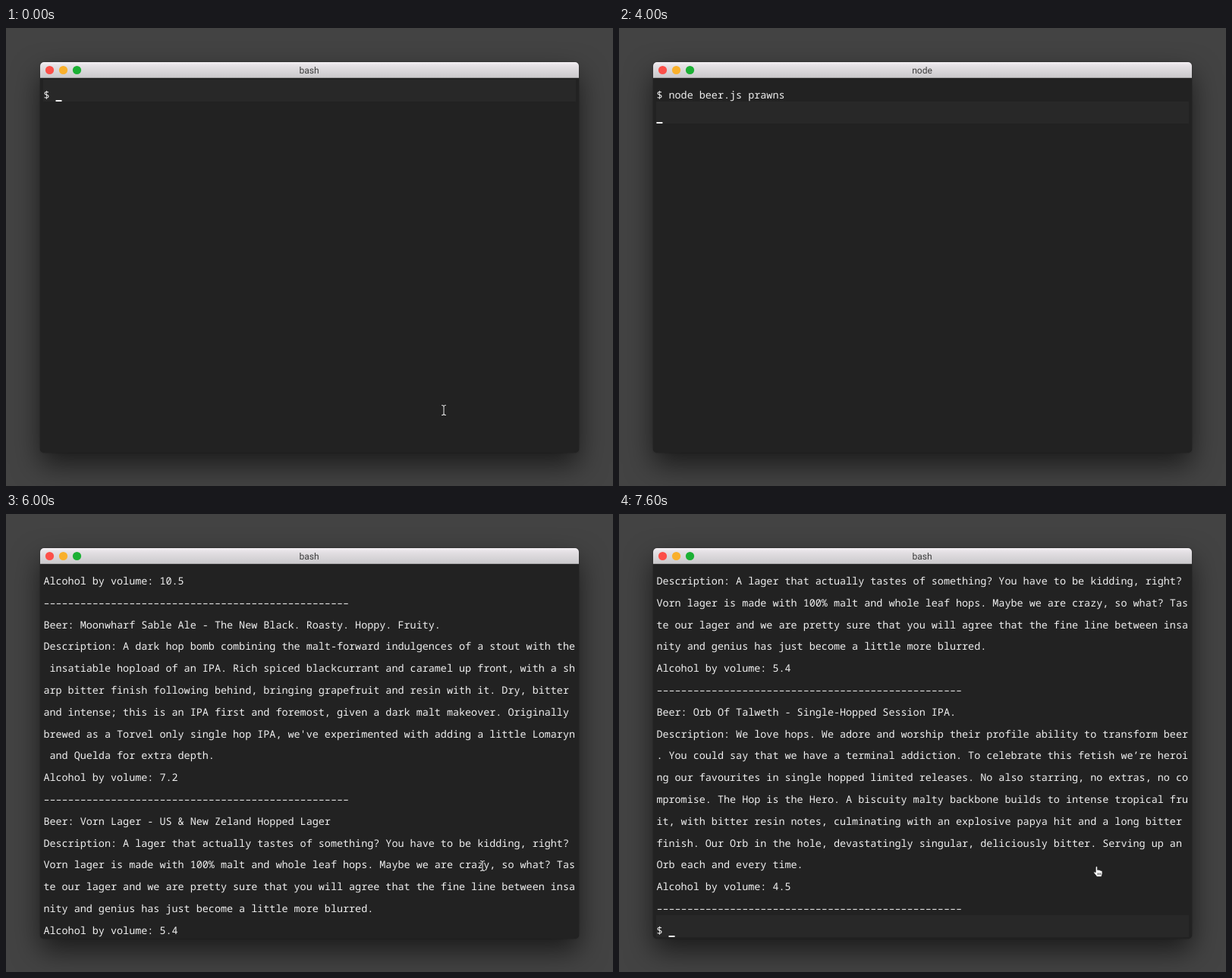
An HTML page for the animation above (7.8 s loop, 800x604 px).

```html
<!DOCTYPE html>
<html lang="en">
<head>
<meta charset="utf-8">
<title>Terminal</title>
<style>
  html, body { margin: 0; width: 100%; height: 100%; overflow: hidden; background: #434343; }
  .window {
    position: absolute; left: 45px; top: 45px; width: 710px; height: 515px;
    border-radius: 5px; background: #222; overflow: hidden;
  }
  .shadow { box-shadow: 0 16px 36px rgba(0, 0, 0, .6), 0 0 2px rgba(0, 0, 0, .4); }
  .bar {
    height: 20px; border-bottom: 1px solid #a9a8a9;
    background: linear-gradient(#f4f0f4, #e4e0e4 25%, #cbcacc);
  }
  svg { position: absolute; left: 0; top: 0; width: 800px; height: 604px; }
  text { white-space: pre; text-rendering: geometricPrecision; }
  #title { font: 12px Roboto, sans-serif; fill: #3a3a3a; text-anchor: middle; }
  #rows { font: 13.433px "Noto Sans Mono", monospace; fill: #f0f0f0; }
</style>
</head>
<body>
<div class="window shadow"><div class="bar"></div></div>
<svg viewBox="0 0 800 604">
  <circle cx="57.5" cy="55.5" r="5.6" fill="#fc4f49"/>
  <circle cx="75.5" cy="55.5" r="5.6" fill="#f9b02b"/>
  <circle cx="93.5" cy="55.5" r="5.6" fill="#1bb034"/>
  <text id="title" x="399.5" y="60"></text>
  <rect id="band" x="49" width="702" height="29" fill="#282828"/>
  <g id="rows"></g>
  <rect id="caret" width="8" height="2" fill="#f0f0f0"/>
  <g id="beam" fill="none" stroke-linecap="round">
    <path id="stem" d="M-2.5-6.5Q0-6.5 0-4.5Q0-6.5 2.5-6.5M0-5V5M-2.5 6.5Q0 6.5 0 4.5Q0 6.5 2.5 6.5" stroke="#222" stroke-width="2.2"/>
    <use href="#stem"/>
    <path d="M-2.5-6.5Q0-6.5 0-4.5Q0-6.5 2.5-6.5M0-5V5M-2.5 6.5Q0 6.5 0 4.5Q0 6.5 2.5 6.5" stroke="#ddd" stroke-width="1.1"/>
  </g>
  <g id="hand" transform="translate(625 464)" stroke="#222" stroke-width=".8" stroke-linejoin="round">
    <path fill="#fff" d="M3.2 8.6V2Q3.2.7 4.4.7T5.6 2V5.5Q6.7 4.6 7.6 5.7Q8.8 5 9.7 6.3Q11.8 5.8 12 7.8V10.6L10.8 14.3H4.8L.9 9.3Q.5 8 1.6 7.8Z"/>
    <path fill="none" d="M6 9.3V12M7.9 9.3V12M9.8 9.3V12"/>
  </g>
</svg>
<script>
const LOOP = 7800, COLS = 87, ROWS = 17;
const LEFT = 49.4, TOP = 68, CELL = 8.06, PITCH = 28.8;
const COMMAND = "node beer.js prawns";

const beers = [
  ["Quietly Unbound - White Wine Barrel-Aged Imperial Red Saison.",
   "This French white wine barrel aged Imperial Saison has a plethora of intertwining flavours. Huge aromas of peach, syrup, tangerine, sherry, toffee and raisin, followed by a dynamic bracing acidity.",
   "10.5"],
  ["Moonwharf Sable Ale - The New Black. Roasty. Hoppy. Fruity.",
   "A dark hop bomb combining the malt-forward indulgences of a stout with the insatiable hopload of an IPA. Rich spiced blackcurrant and caramel up front, with a sharp bitter finish following behind, bringing grapefruit and resin with it. Dry, bitter and intense; this is an IPA first and foremost, given a dark malt makeover. Originally brewed as a Torvel only single hop IPA, we've experimented with adding a little Lomaryn and Quelda for extra depth.",
   "7.2"],
  ["Vorn Lager - US & New Zeland Hopped Lager",
   "A lager that actually tastes of something? You have to be kidding, right? Vorn lager is made with 100% malt and whole leaf hops. Maybe we are crazy, so what? Taste our lager and we are pretty sure that you will agree that the fine line between insanity and genius has just become a little more blurred.",
   "5.4"],
  ["Orb Of Talweth - Single-Hopped Session IPA.",
   "We love hops. We adore and worship their profile ability to transform beer. You could say that we have a terminal addiction. To celebrate this fetish we\u2019re heroing our favourites in single hopped limited releases. No also starring, no extras, no compromise. The Hop is the Hero. A biscuity malty backbone builds to intense tropical fruit, with bitter resin notes, culminating with an explosive papya hit and a long bitter finish. Our Orb in the hole, devastatingly singular, deliciously bitter. Serving up an Orb each and every time.",
   "4.5"]
];

const wrap = s => s.match(new RegExp(`.{1,${COLS}}`, "g"));
const rule = "\u2013".repeat(50);
const output = [
  "$ " + COMMAND, rule,
  ...beers.flatMap(([name, about, abv]) => [
    "Beer: " + name, ...wrap("Description: " + about), "Alcohol by volume: " + abv, rule
  ]),
  "$ "
];

// Each track is a list of [start ms, value] steps.
const typed = [[0, 0], [800, 1], [1000, 4], [1200, 5], [1400, 7], [1600, 8], [1800, 13],
  [2600, 14], [2800, 15], [3000, 16], [3200, 17], [3400, 19]];
const phase = [[0, "typing"], [3800, "waiting"], [4400, "done"]];
const scroll = [[0, 0], [4400, 18], [5600, 14], [5800, 10], [6000, 6], [6200, 2],
  [6400, 0], [7000, 9], [7200, 18]];
const titles = [[0, "bash"], [4000, "node"], [5200, "bash"]];
const pointer = [[0, [577, 504]], [800, null], [5000, [607.5, 482]], [5200, [628, 464]], [7600, "hand"]];

const at = (track, t) => track.findLast(step => step[0] <= t)[1];
const el = id => document.getElementById(id);
const show = (node, on) => node.setAttribute("visibility", on ? "visible" : "hidden");
const place = (node, attrs) => {
  for (const key in attrs) node.setAttribute(key, attrs[key]);
};

const rows = Array.from({ length: ROWS }, (_, i) => {
  const row = document.createElementNS("http://www.w3.org/2000/svg", "text");
  place(row, { x: LEFT, y: Math.round(TOP + 25 + i * PITCH) });
  return el("rows").appendChild(row);
});

function screenAt(t) {
  switch (at(phase, t)) {
    case "typing": return ["$ " + COMMAND.slice(0, at(typed, t))];
    case "waiting": return ["$ " + COMMAND, ""];
    default: return output;
  }
}

function draw(t) {
  const lines = screenAt(t), first = at(scroll, t);
  rows.forEach((row, i) => {
    const line = lines[first + i] || "";
    if (row.textContent !== line) row.textContent = line;
  });

  const last = lines.length - 1, active = last - first;
  const y = Math.round(TOP + active * PITCH);
  place(el("band"), { y });
  place(el("caret"), { x: LEFT + lines[last].length * CELL, y: y + 27 });
  show(el("band"), active < ROWS);
  show(el("caret"), active < ROWS);

  el("title").textContent = at(titles, t);
  const p = at(pointer, t), beam = Array.isArray(p);
  show(el("hand"), p === "hand");
  show(el("beam"), beam);
  if (beam) place(el("beam"), { transform: `translate(${p})` });
}

const start = performance.now();
function tick() {
  draw((performance.now() - start) % LOOP);
  requestAnimationFrame(tick);
}
tick();
</script>
</body>
</html>
```
